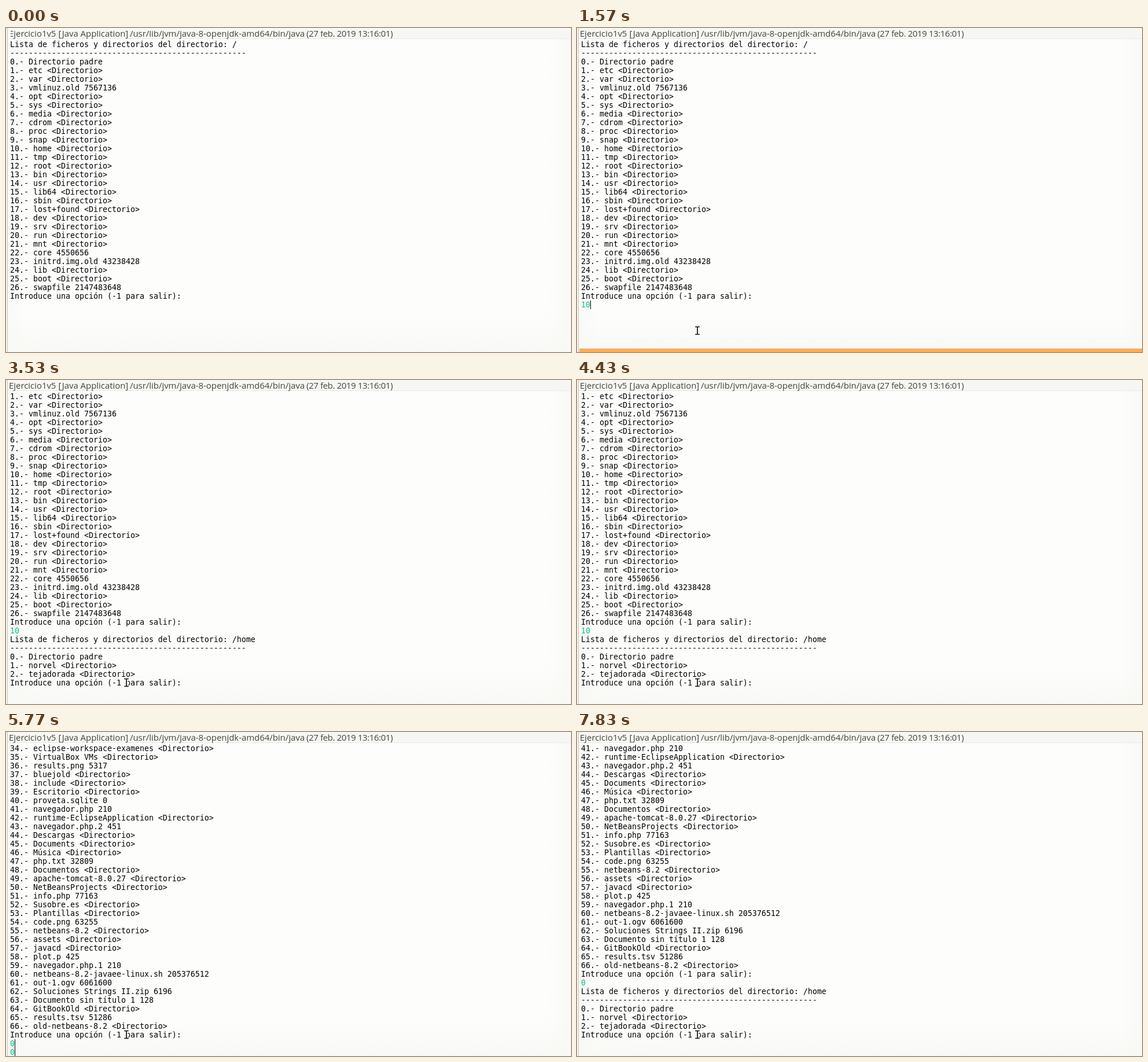
An HTML page for the animation above (8 s loop, 976 by 560 pixels).

```html
<!DOCTYPE html>
<html lang="es">
<head>
<meta charset="utf-8">
<title>Consola</title>
<style>
  html, body { margin: 0; width: 100%; height: 100%; overflow: hidden; }
  #stage { position: relative; width: 976px; height: 560px; overflow: hidden; background: #fdfdfc; }
  #stage > * { position: absolute; }
  #shade {
    inset: 0;
    background:
      linear-gradient(90deg, #f8f8f5 0, #f8f8f500 35px),
      linear-gradient(270deg, #f8f8f5 0, #f8f8f500 40px),
      linear-gradient(0deg, #f8f8f5 0, #f8f8f500 60px);
  }
  #head { left: 0; top: 0; width: 976px; height: 19px; background: #f6f6f2; border-bottom: 1px solid #ebebe6; box-sizing: border-box; }
  #edge { left: 0; top: 0; width: 2px; height: 560px; background: #f4f4ef; border-right: 1px solid #c6c6be; }
  #title { left: 0; top: 0; }
  #title text { font: 14.9px "Open Sans", "Noto Sans", sans-serif; fill: #45453f; }
  #text {
    left: 7px; top: 21px; margin: 0; color: #000;
    font: 13.29px/15px "DejaVu Sans Mono", monospace;
    font-variant-ligatures: none;
  }
  #text i { font-style: normal; color: #00c87d; }
  #text b { display: inline-block; width: 1px; height: 15px; margin-right: -1px; background: #000; vertical-align: top; }
  #cover { left: 3px; top: 0; width: 5px; height: 480px; background: #fafaf7; }
  #lid { left: 3px; top: 0; width: 973px; height: 5px; background: #f8f8f5; }
  #bar { left: 4px; top: 554px; width: 972px; height: 6px; animation: glow 8s linear infinite; }
  @keyframes glow {
    0%, 1.25% { background: #ffb4a000; }
    4.5%, 6% { background: #ffb4a0; }
    12%, 29.625% { background: #ffad52; }
    33.375% { background: #ffe6bc; }
    39.6%, 100% { background: #ffe6bc00; }
  }
  #mouse { left: -6px; top: -9px; animation: move 8s linear infinite; }
  @keyframes move {
    0%, 2.1% { transform: translate(190px, 496px); opacity: 0; }
    2.11% { transform: translate(190px, 496px); opacity: 1; }
    5.375%, 6% { transform: translate(194px, 502px); }
    11.25%, 100% { transform: translate(208px, 523px); }
  }
</style>
</head>
<body>
<div id="stage">
  <div id="shade"></div>
  <div id="head"></div>
  <svg id="title" width="976" height="20">
    <text x="5" y="15">Ejercicio1v5</text>
    <text x="90.5" y="15">[Java Application]</text>
    <text x="214" y="15">/usr/lib/jvm/java-8-openjdk-amd64/bin/java</text>
    <text x="519" y="15" letter-spacing="-.35">(27 feb. 2019 13:16:01)</text>
  </svg>
  <pre id="text"></pre>
  <div id="cover"></div>
  <div id="lid"></div>
  <div id="edge"></div>
  <div id="bar"></div>
  <svg id="mouse" width="12" height="18">
    <g fill="none" stroke-linecap="square">
      <path d="M3 2.5H5M7 2.5H9M6 3.5V14.5M3 15.5H5M7 15.5H9" stroke="#fff" stroke-width="4"/>
      <path d="M3 2.5H5M7 2.5H9M6 3.5V14.5M3 15.5H5M7 15.5H9" stroke="#000" stroke-width="1.6"/>
    </g>
  </svg>
</div>
<script>
const LOOP = 8000, ROWS = 36, PROMPT_ROW = 33;
const PROMPT = "Introduce una opción (-1 para salir):";

const rootDir = `etc/ var/ vmlinuz.old 7567136|opt/ sys/ media/ cdrom/ proc/ snap/ home/ tmp/ root/ bin/ usr/ lib64/ sbin/ lost+found/ dev/ srv/ run/ mnt/ core 4550656|initrd.img.old 43238428|lib/ boot/ swapfile 2147483648|`;
const userDir = `eclipse-workspace-examenes/ VirtualBox VMs/ results.png 5317|bluejold/ include/ Escritorio/ proveta.sqlite 0|navegador.php 210|runtime-EclipseApplication/ navegador.php.2 451|Descargas/ Documents/ Música/ php.txt 32809|Documentos/ apache-tomcat-8.0.27/ NetBeansProjects/ info.php 77163|Susobre.es/ Plantillas/ code.png 63255|netbeans-8.2/ assets/ javacd/ plot.p 425|navegador.php.1 210|netbeans-8.2-javaee-linux.sh 205376512|out-1.ogv 6061600|Soluciones Strings II.zip 6196|Documento sin título 1 128|GitBookOld/ results.tsv 51286|old-netbeans-8.2/`;

// "/" ends a folder, "|" ends a file with its size
const entries = (list, first) =>
  list.match(/[^\/|]+[\/|]/g).map((e, i) =>
    `${first + i}.- ` + e.trim().replace("/", " <Directorio>").replace("|", ""));

const listing = (path, items) => [
  "Lista de ficheros y directorios del directorio: " + path,
  "-".repeat(51), "0.- Directorio padre", ...items, PROMPT
];

const escape = s => s.replace(/</g, "&lt;").replace(/>/g, "&gt;");
const typed = (s, caret) => `<i>${s}</i>${caret ? "<b></b>" : ""}`;

const home = listing("/home", entries("norvel/ tejadorada/", 1)).map(escape);
const root = listing("/", entries(rootDir, 1)).map(escape);
const inHome = [...root, typed("10"), ...home];
const inUser = [...entries(userDir, 34), PROMPT].map(escape);
const backHome = [...inUser, typed("0"), ...home];

// start time, lines, input rows below the prompt
const states = [
  [0, root, []],
  [1300, root, [typed("1", true)]],
  [1570, root, [typed("10", true)]],
  [2370, root, [typed("10")]],
  [2770, root, [typed("10", true)]],
  [3300, inHome, []],
  [4630, inHome, [typed("1", true)]],
  [5000, inUser, []],
  [5770, inUser, [typed("0", true), typed("0", true)]],
  [7530, backHome, []]
];

const text = document.getElementById("text");
const covers = ["cover", "lid"].map(id => document.getElementById(id));
const moving = ["bar", "mouse"].map(id => document.getElementById(id).getAnimations()[0]);
moving.forEach(a => a.pause());

const begin = performance.now();
let shown;

function draw() {
  const t = (performance.now() - begin) % LOOP;
  const state = states.findLast(s => s[0] <= t);
  if (state !== shown) {
    const [, lines, input] = shown = state;
    const top = Math.max(0, lines.length - 1 - PROMPT_ROW);
    text.innerHTML = [...lines.slice(top), ...input].slice(0, ROWS).join("\n");
  }
  covers.forEach(c => c.style.visibility = t < 100 ? "visible" : "hidden");
  moving.forEach(a => a.currentTime = t);
  requestAnimationFrame(draw);
}
draw();
</script>
</body>
</html>
```
